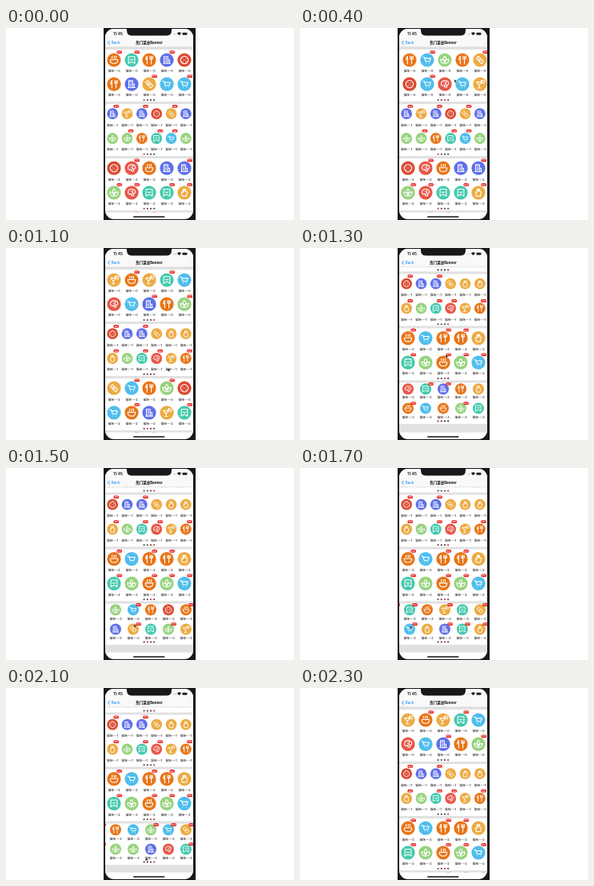
Write an HTML page that moves like this. It is 360 px wide and 240 px high and loops after 2.4 s.

```html
<!DOCTYPE html>
<html lang="zh">
<head>
<meta charset="utf-8">
<title>Menu banner</title>
<style>
html, body { margin: 0; width: 100%; height: 100%; overflow: hidden; background: #fff; }
svg { display: block; width: 360px; height: 240px; }
text { font-family: Inter, "Noto Sans CJK SC", "Noto Sans CJK", sans-serif; }
.label { font-size: 3.75px; font-weight: 500; fill: #222; text-anchor: middle; }
.badge { font-size: 2.7px; font-weight: 600; fill: #fff; text-anchor: middle; }
.glyph { fill: none; stroke: #fff; stroke-width: 1.25; stroke-linecap: round; stroke-linejoin: round; }
</style>
</head>
<body>
<svg id="stage" viewBox="0 0 360 240">
  <defs>
    <clipPath id="screen"><rect x="124" y="1" width="110" height="238" rx="11"/></clipPath>
    <clipPath id="table"><rect x="124" y="24" width="110" height="206.5"/></clipPath>
  </defs>
  <rect width="360" height="240" fill="#fff"/>
  <rect x="122" width="115" height="240" fill="#17181a"/>
  <g clip-path="url(#screen)">
    <rect x="124" width="110" height="240" fill="#fff"/>
    <g clip-path="url(#table)">
      <rect x="124" y="24" width="110" height="207" fill="#e1e1e2"/>
      <g id="list"></g>
    </g>
    <rect x="124" width="110" height="24" fill="#f9f9f9"/>
    <rect x="124" y="23.7" width="110" height=".4" fill="#c4c4c6"/>
    <path d="M149 0q2 0 2 2.5q0 7 6 7h44q6 0 6-7q0-2.500 2-2.500z" fill="#17181a"/>
    <text x="140" y="8.900" font-size="4.900" font-weight="600" text-anchor="middle" fill="#111">11:45</text>
    <g fill="#222">
      <circle cx="209.500" cy="7.800" r=".4"/><circle cx="211" cy="7.800" r=".4"/><circle cx="212.500" cy="7.800" r=".4"/>
      <path d="M213.800 6.400q2.700-2.400 5.400 0l-2.700 2.900z"/>
      <rect x="220.500" y="5.700" width="5.800" height="3.100" rx=".8"/>
      <rect x="226.600" y="6.700" width=".5" height="1.200"/>
    </g>
    <path d="M129.700 16.100l-2.300 2.300l2.300 2.300" fill="none" stroke="#0a7aff" stroke-width=".9"/>
    <text x="131.700" y="20.100" font-size="4.500" fill="#0a7aff">Back</text>
    <text x="179" y="20.100" font-size="4.500" font-weight="700" text-anchor="middle" fill="#111">热门菜单Banner</text>
    <rect x="159" y="235.300" width="39.500" height="1.500" rx=".75" fill="#111"/>
  </g>
  <path id="cursor" d="M0 0v4.200l1-.9l.8 1.700l.8-.4l-.8-1.600h1.400z" fill="#111" stroke="#fff" stroke-width=".35"/>
</svg>
<script>
const NS = 'http://www.w3.org/2000/svg';
const LOOP = 2400, STEP = 100, LEFT = 124, WIDTH = 110;

// colour and glyph, drawn around 0,0 in a circle of radius 10
const ICONS = {
  b: ['#e87518', 'M-5.500-.5h11q0 5-4 5.500h-3q-4-.5-4-5.500zM-2.500-2.500q-1-1 0-3M.5-2.500q-1-1 0-3M3-2.500q-1-1 0-3'],
  k: ['#45c9ad', 'M-4.500-5h9v10l-4.500-2.500l-4.500 2.500zM-2-1q2 2 4 0'],
  f: ['#e87518', 'M-3 5.500v-11q-2 2-2 5h2M3 5.500v-11M1-5.500v4h4v-4'],
  d: ['#5f70ea', 'M-5 5h10M-4 5v-10h5.500v10M1.500 0h2.500v5M-2-2.500h1.500M-2 0h1.500M-2 2.500h1.500'],
  r: ['#db4a31', 'M0-5.500a5.500 5.500 0 1 0 .01 0M-2.200-2.200h.01M2.200-2.200h.01M-2.200 2.200h.01M2.200 2.200h.01M0 0h.01'],
  t: ['#edab43', 'M-5.300-2.300l3-3l7.600 7.600l-3 3zM-1 2l3-3M-2-1.500l2 2'],
  p: ['#edab43', 'M-5-3h8l-4 4.500zM-1 1.500v4M-3 5.500h4M1-3l2-3M3-2.500a2 2 0 1 0 0-2'],
  h: ['#edab43', 'M-3 5q-2-5-.5-6l1.500 1v-5h1.500v3l1-3h1.500l-.5 3.500q3-1 2.500 2l-1 4.500z'],
  c: ['#4fbeec', 'M-6-4h2l2 6h5.500l1.500-4.500h-8M-1.500 4.500h.01M3 4.500h.01'],
  l: ['#97d37e', 'M0 5q-6 0-6-6q5 0 6 5q1-5 6-5q0 6-6 6M0 1q-4-3 0-6.500q4 3.500 0 6.500'],
  e: ['#e85748', 'M-5 1q-1-6 5-6q6 0 5.500 5l-2.500 1.500v3h-3v-3q-3 2-5-.5M-1-1.500h.01M2-3q-2 2 0 4']
};

// capital letters carry a badge; each page holds two rows
const SECTIONS = [
  { top: 27, h: 65, r: 8.6, rows: [13, 43.2], label: 13.8, badge: [6.7, -9.9], dots: 63,
    pages: ['BKfDr fdTcC', 'lTbcr KfLdh', 'fClfT rCecp', 'pBpKc ecDfL'] },
  { top: 95, h: 65, r: 6.9, rows: [12.2, 43], label: 14, badge: [4.6, -9.4], dots: 62.8,
    pages: ['DpDrTd lLfKCl', 'ClhBre dKfPlc', 'rppCTt KTpFft', 'RdDthh HlKEpF'] },
  { top: 163, h: 65, r: 8.6, rows: [12.2, 42.8], label: 13.9, badge: [6.7, -9.9], dots: 62.7,
    pages: ['rEbdD LEkKH', 'tCfLr cBdpK', 'BcFFh KlBLC', 'rKtcb hFplD'] },
  { top: 231, h: 51.5, r: 7, rows: [7.8, 32], label: 10.8, badge: [6.6, -6.3], dots: 48,
    pages: ['eKDfh BcbLk', 'lCfrB dTkLp', 'KbPkT ChDKH', 'fcLCT lldeK'] }
];

// [step, value] changes; each value holds until the next
const NEAR = 0.018;
const PAGES = [
  [[0, 0], [1, .45], [2, 1 - NEAR], [3, 1.55], [4, 2 - NEAR], [5, 2.6], [6, 3 - NEAR], [7, 3]],
  [[0, 0], [6, .5], [7, 1], [8, 2], [9, 2.6], [10, 3]],
  [[0, 0], [10, .6], [11, 1], [12, 2 - NEAR], [13, 2]],
  [[0, 0], [14, .6], [15, 1 - NEAR], [16, 1.7], [17, 2 - NEAR], [18, 2], [19, 2.3], [20, 2.8], [21, 3 - NEAR], [22, 3]]
];
const SCROLL = [[0, 0], [13, 62.6], [14, 61.5], [22, 30], [23, 0]];
const CURSOR = [[0, null], [1, [206, 62]], [2, [188, 64]], [3, [208, 64]], [4, [193, 64]], [5, [184, 66]],
  [6, [204, 118]], [8, [197.5, 121]], [9, [178, 123]], [10, [202, 150]], [12, [184, 142]], [13, [182, 133]],
  [14, [190, 190]], [15, [160, 195]], [17, [137.5, 197]], [19, [195, 206]], [21, [174.5, 212]], [22, [178, 160]], [23, null]];

const at = (track, step) => track.filter(p => p[0] <= step).pop()[1];

function add(parent, tag, attrs, text) {
  const el = document.createElementNS(NS, tag);
  for (const k in attrs) el.setAttribute(k, attrs[k]);
  if (text) el.textContent = text;
  return parent.appendChild(el);
}

function addItem(parent, s, index, code, x, y) {
  const [color, path] = ICONS[code.toLowerCase()];
  add(parent, 'circle', { cx: x, cy: y, r: s.r, fill: color });
  add(parent, 'path', { d: path, class: 'glyph', transform: `translate(${x} ${y}) scale(${s.r / 10})` });
  add(parent, 'text', { x, y: y + s.label + 1.4, class: 'label' }, '猫咪---' + index);
  if (code === code.toLowerCase()) return;
  const bx = x + s.badge[0], by = y + s.badge[1];
  add(parent, 'rect', { x: bx - 3.3, y: by - 1.9, width: 6.6, height: 3.8, rx: 1.5, fill: '#e8211d' });
  add(parent, 'text', { x: bx, y: by + .9, class: 'badge' }, 'hot');
}

const list = document.getElementById('list');
const cursor = document.getElementById('cursor');

const views = SECTIONS.map((s, index) => {
  const g = add(list, 'g', { transform: `translate(${LEFT} ${s.top})` });
  add(g, 'rect', { width: WIDTH, height: s.h, fill: '#fff' });
  const strip = add(g, 'g', {});
  s.pages.forEach((page, p) => page.split(' ').forEach((row, r) =>
    [...row].forEach((code, i) =>
      addItem(strip, s, index, code, WIDTH * (p + (i + .5) / row.length), s.rows[r]))));
  const dots = s.pages.map((_, i) => add(g, 'circle', { cx: 48.6 + i * 4.2, cy: s.dots, r: 1.05 }));
  return { strip, dots };
});

function draw(step) {
  list.setAttribute('transform', `translate(0 ${-at(SCROLL, step)})`);
  views.forEach(({ strip, dots }, i) => {
    const page = at(PAGES[i], step);
    strip.setAttribute('transform', `translate(${-page * WIDTH} 0)`);
    dots.forEach((dot, d) => dot.setAttribute('fill', d === Math.round(page) ? '#e0221e' : '#3c3c3e'));
  });
  const pos = at(CURSOR, step);
  cursor.setAttribute('visibility', pos ? 'visible' : 'hidden');
  if (pos) cursor.setAttribute('transform', `translate(${pos})`);
}

const start = performance.now();
function tick() {
  draw(Math.floor((performance.now() - start) % LOOP / STEP));
  requestAnimationFrame(tick);
}
tick();
</script>
</body>
</html>
```
